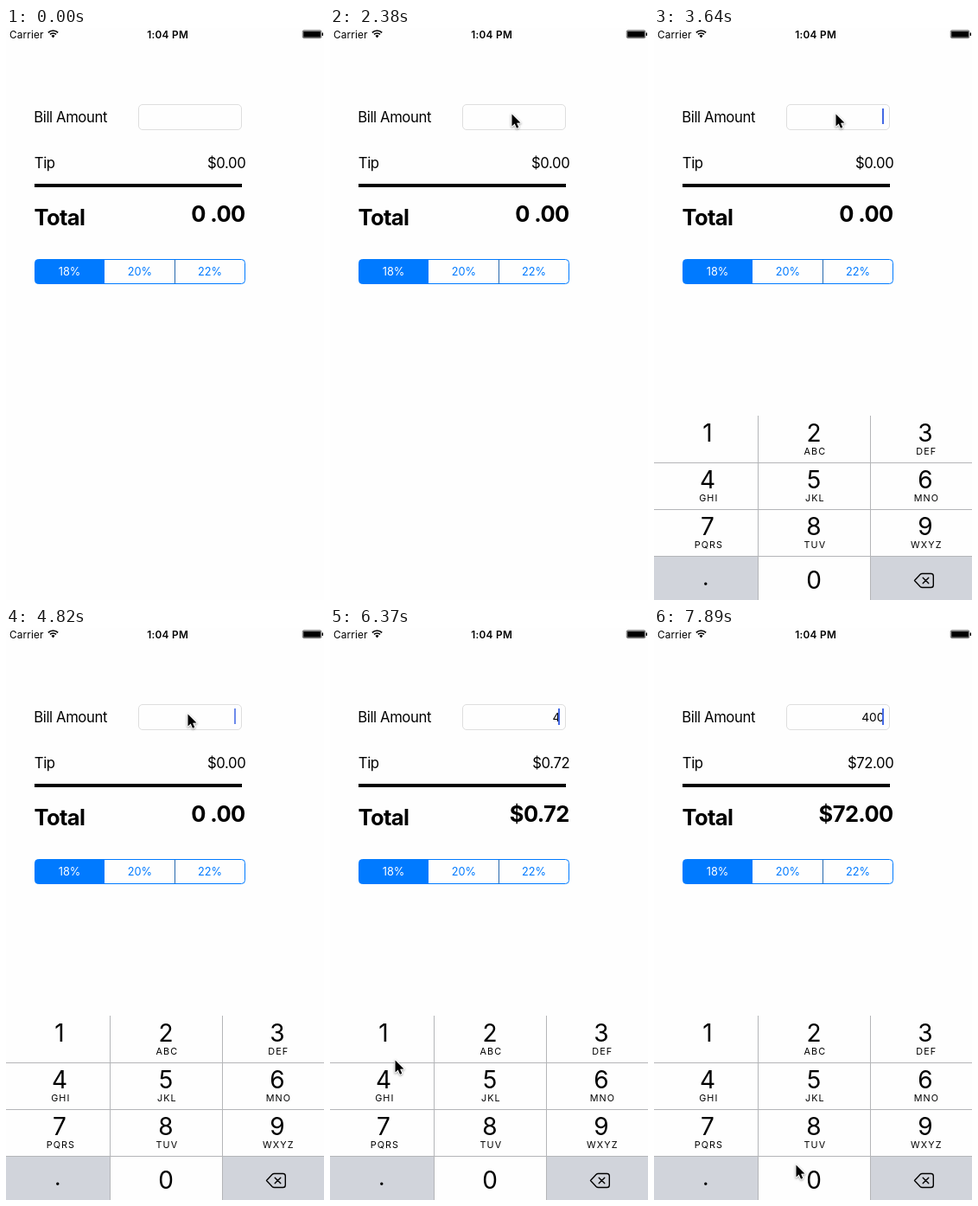
An HTML page with a canvas that plays this animation: 368 px wide and 661 px high, repeating every 8000 ms.

```html
<!DOCTYPE html>
<html lang="en">
<head>
<meta charset="utf-8">
<title>Tip calculator</title>
<style>
  html, body { margin: 0; width: 100%; height: 100%; overflow: hidden; background: #fefefe; }
  canvas { display: block; width: 368px; height: 661px; }
</style>
</head>
<body>
<canvas id="stage"></canvas>
<script>
const W = 368, H = 661, LOOP = 8000;
const BLUE = '#007aff', PAPER = '#fefefe', GREY = '#d1d4db', RULE = '#b4b5b8';
const canvas = document.getElementById('stage');
const ctx = canvas.getContext('2d');
const dpr = window.devicePixelRatio || 1;
canvas.width = W * dpr;
canvas.height = H * dpr;

const clamp = v => Math.max(0, Math.min(1, v));
const ramp = (t, a, b) => clamp((t - a) / (b - a));
const smooth = p => p * p * (3 - 2 * p);
const easeOut = p => 1 - (1 - p) * (1 - p);
const linear = p => p;

function rect(x, y, w, h, color) {
  ctx.fillStyle = color;
  ctx.fillRect(x, y, w, h);
}

function text(str, x, y, size, o = {}) {
  const { weight = 400, color = '#000', align = 'left', track = 0 } = o;
  ctx.font = `${weight} ${size}px Inter, Roboto, sans-serif`;
  ctx.letterSpacing = track + 'px';
  ctx.textAlign = 'left';
  ctx.fillStyle = color;
  const w = ctx.measureText(str).width - track;
  const shift = { left: 0, center: w / 2, right: w }[align];
  ctx.fillText(str, x - shift, y);
}

function poly(points) {
  ctx.beginPath();
  points.forEach(([x, y], i) => i ? ctx.lineTo(x, y) : ctx.moveTo(x, y));
  ctx.closePath();
}

// Pointer path: time, x, y, easing toward this point
const path = [
  [150, 364, 296, linear], [320, 356, 294, linear], [1250, 356, 294, linear],
  [1860, 221, 67, smooth], [2030, 215, 73, linear], [2070, 215, 73, linear],
  [2380, 210, 99, smooth], [4880, 210, 99, linear], [5500, 29, 433, smooth],
  [5620, 63, 508, easeOut], [5670, 63, 508, linear], [5740, 63, 512, linear],
  [6170, 63, 512, linear], [6370, 75, 499, smooth], [6650, 164, 620, easeOut]
];

function pointerAt(t) {
  if (t < path[0][0]) return null;
  const i = path.findIndex(k => k[0] > t);
  if (i < 0) return path[path.length - 1].slice(1, 3);
  const a = path[i - 1], b = path[i];
  const p = b[3](ramp(t, a[0], b[0]));
  return [a[1] + (b[1] - a[1]) * p, a[2] + (b[2] - a[2]) * p];
}

function drawPointer(t) {
  const pos = pointerAt(t);
  if (!pos) return;
  ctx.save();
  ctx.translate(pos[0] + 0.5, pos[1] + 0.5);
  poly([[0, 0], [0, 14], [3.2, 11], [5.5, 16.2], [7.8, 15.2], [5.6, 10.2], [10, 10]]);
  ctx.shadowColor = 'rgba(0,0,0,.4)';
  ctx.shadowBlur = 2.5 * dpr;
  ctx.shadowOffsetY = dpr;
  ctx.lineWidth = 2;
  ctx.lineJoin = 'round';
  ctx.strokeStyle = '#fff';
  ctx.stroke();
  ctx.shadowColor = 'transparent';
  ctx.fillStyle = '#000';
  ctx.fill();
  ctx.restore();
}

function drawStatus() {
  text('Carrier', 4, 11.5, 11.8, { track: 0.15 });
  text('1:04 PM', 187, 11.5, 11.8, { weight: 600, align: 'center', track: 0.3 });
  ctx.strokeStyle = '#000';
  ctx.lineWidth = 1.7;
  for (const r of [8, 5]) {
    ctx.beginPath();
    ctx.arc(54.5, 11, r, -Math.PI * 0.75, -Math.PI * 0.25);
    ctx.stroke();
  }
  ctx.fillStyle = '#000';
  ctx.beginPath();
  ctx.moveTo(54.5, 11.5);
  ctx.arc(54.5, 11, 2.8, -Math.PI * 0.75, -Math.PI * 0.25);
  ctx.fill();
  ctx.lineWidth = 0.6;
  ctx.beginPath();
  ctx.roundRect(343.3, 2.8, 21.6, 8.8, 1.5);
  ctx.stroke();
  rect(344.2, 3.7, 19.8, 7, '#000');
  rect(365.6, 5.5, 1.4, 3.4, '#000');
}

function drawSegments() {
  ctx.beginPath();
  ctx.roundRect(33.5, 267.5, 243, 28, 4);
  ctx.save();
  ctx.clip();
  rect(33, 267, 81, 29, BLUE);
  ctx.restore();
  ctx.strokeStyle = BLUE;
  ctx.lineWidth = 1;
  ctx.stroke();
  rect(195, 268, 1, 27, '#2868ad');
  ['18%', '20%', '22%'].forEach((s, i) =>
    text(s, 73.5 + i * 81.3, 286, 12.75, { color: i ? BLUE : '#fff', align: 'center' }));
}

function caretAlpha(t) {
  if (t < 3130) return 0;
  const blinks = [[3890, 4360], [4770, 5240], [6430, 6900]];
  return blinks.reduce((a, [off, on]) =>
    a - ramp(t, off, off + 220) + ramp(t, on, on + 160), 1);
}

function drawForm(t) {
  const bill = t < 5960 ? '' : t < 7360 ? '4' : t < 7830 ? '40' : '400';
  const tip = '$' + (bill * 0.18).toFixed(2);
  const body = { track: -0.4 }, bold = { weight: 700, track: -0.6 };
  text('Bill Amount', 32.3, 108.5, 16.7, body);
  text('Tip', 32.8, 161.5, 16.7, body);
  text(tip, 277.7, 161.5, 16.7, { ...body, align: 'right' });
  text('Total', 32.5, 228, 25.5, bold);
  text(bill ? tip : '0 .00', 277.3, 224, 25.5, { ...bold, align: 'right' });
  rect(33, 180, 240, 4, '#000');

  ctx.strokeStyle = '#dedede';
  ctx.lineWidth = 1;
  ctx.beginPath();
  ctx.roundRect(153.5, 88.5, 119, 29, 4.5);
  ctx.stroke();
  text(bill, 266.3, 108, 13.75, { align: 'right', track: -0.1 });
  ctx.globalAlpha = caretAlpha(t);
  rect(264, 93, 2, bill ? 19 : 18, '#4368e4');
  ctx.globalAlpha = 1;
}

function drawDelete() {
  ctx.strokeStyle = '#000';
  ctx.lineWidth = 1.4;
  ctx.lineJoin = ctx.lineCap = 'round';
  ctx.beginPath();
  ctx.moveTo(301.5, 638.5);
  ctx.lineTo(308, 631.5);
  ctx.quadraticCurveTo(309, 630.5, 310.5, 630.5);
  ctx.lineTo(320.5, 630.5);
  ctx.quadraticCurveTo(323.3, 630.5, 323.3, 633.3);
  ctx.lineTo(323.3, 643.7);
  ctx.quadraticCurveTo(323.3, 646.5, 320.5, 646.5);
  ctx.lineTo(310.5, 646.5);
  ctx.quadraticCurveTo(309, 646.5, 308, 645.5);
  ctx.closePath();
  ctx.moveTo(311.2, 635.2);
  ctx.lineTo(317.8, 641.8);
  ctx.moveTo(317.8, 635.2);
  ctx.lineTo(311.2, 641.8);
  ctx.stroke();
}

function drawKeys(t) {
  if (t < 3130) return;
  // Critically damped slide
  const k = (t - 3060) * 0.0143;
  const rise = t < 3640 ? 213 * (1 + k) * Math.exp(-k) : 0;
  const held = (a, b) => t >= a && t < b;
  ctx.save();
  ctx.translate(0, Math.round(rise));
  rect(0, 448, W, 213, PAPER);
  rect(0, 611, 120, 50, GREY);
  rect(251, 611, 117, 50, GREY);
  if (held(5910, 6020)) rect(0, 503, 120, 53, GREY);
  if (held(7240, 7420) || held(7720, 7890)) rect(121, 611, 129, 50, GREY);
  for (const y of [502, 556, 610]) rect(0, y, W, 1, RULE);
  for (const x of [120, 250]) rect(x, 448, 1, 213, RULE);

  const letters = ['', 'ABC', 'DEF', 'GHI', 'JKL', 'MNO', 'PQRS', 'TUV', 'WXYZ'];
  const cols = [62, 185, 314];
  letters.forEach((s, i) => {
    const x = cols[i % 3], y = 448 + Math.floor(i / 3) * 54;
    text(String(i + 1), x, y + 30, 28, { align: 'center' });
    text(s, x + 0.8, y + 45.2, 10.8, { align: 'center', track: 1.1 });
  });
  text('0', 185, 647.5, 28, { align: 'center' });
  text('.', 59.7, 643.5, 26, { align: 'center' });
  drawDelete();
  ctx.restore();
}

function draw(now) {
  const t = now % LOOP;
  ctx.setTransform(dpr, 0, 0, dpr, 0, 0);
  rect(0, 0, W, H, PAPER);
  drawStatus();
  drawForm(t);
  drawSegments();
  drawKeys(t);
  drawPointer(t);
}

let start;
function tick(now) {
  start ??= now;
  draw(now - start);
  requestAnimationFrame(tick);
}
draw(0);
requestAnimationFrame(tick);
</script>
</body>
</html>
```
